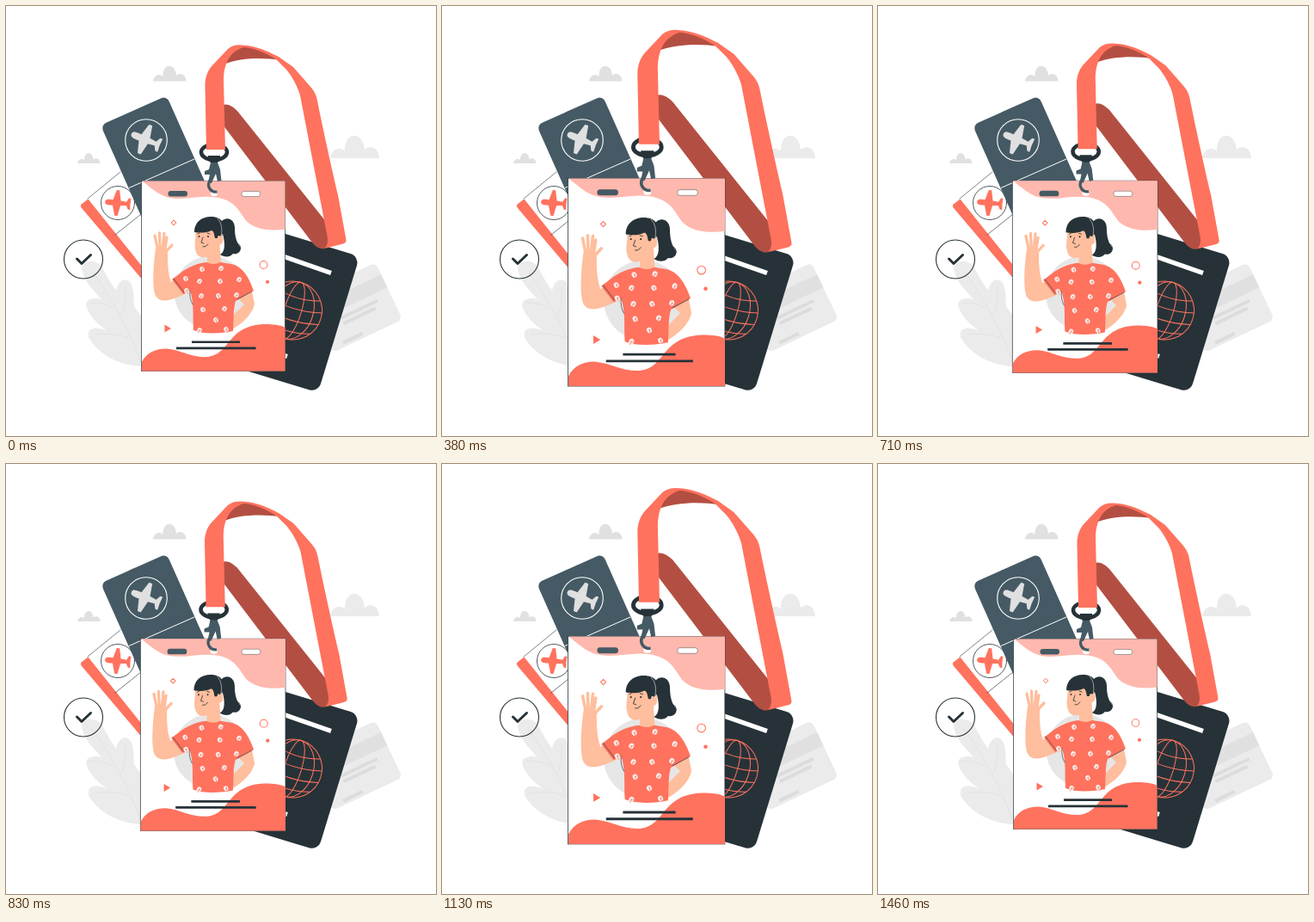
Animation of 500 by 500 pixels, one loop 1500 ms. Source, as an HTML page:

```html
<!DOCTYPE html>
<html lang="en">
<head>
<meta charset="utf-8">
<title>Travel badge</title>
<style>
  html, body { margin: 0; width: 100%; height: 100%; overflow: hidden; background: #fff; }
  svg { display: block; width: 100%; height: 100%; }
  .coral { fill: #ff725e; }
  .dark { fill: #263238; }
  .slate { fill: #455a64; }
  .shade { fill: #b34f42; }
  .skin { fill: #ffbe9d; }
  .pale { fill: #ebebeb; }
  .grey { fill: #e0e0e0; }
  .line { fill: none; stroke: #263238; stroke-linecap: round; stroke-linejoin: round; }
  .coralLine { fill: none; stroke: #ff725e; }
</style>
</head>
<body>
<svg viewBox="0 0 500 500">
  <defs>
    <path id="cloud" d="M0 17.500C1 10 8 8 11.500 12C11-4 26-4 27 11C31 7 38 9 38.500 17.500Z"/>
    <path id="plane" d="M-18 0C-18-3.500-14-4-10-4H-7L-3-18H1L4-3.500L12-2.500L15-8H18L17.500 0L18 8H15L12 2.500L4 3.500L1 18H-3L-7 4H-10C-14 4-18 3.500-18 0Z"/>
    <g id="leaf"><ellipse rx="2.700" ry="3.100" fill="#f6ece9"/><path class="coralLine" stroke-width=".6" d="M0 4V-1M0 1L1.500-1"/></g>
  </defs>

  <use href="#cloud" class="grey" x="171" y="70"/>
  <use href="#cloud" class="grey" transform="translate(83 171) scale(.69)"/>
  <use href="#cloud" class="pale" transform="translate(377 151) scale(1.48)"/>

  <g class="pale">
    <path d="M88 304C92 293 108 295 113 306C117 314 121 321 128 331C130 321 136 316 142 319C149 324 148 336 149 349L160 365V419C132 419 108 405 97 387C93 378 99 373 109 375C115 376 119 378 123 381C109 373 94 358 93 347C94 340 104 339 111 341C101 330 89 318 88 304Z"/>
    <path d="M100 308C116 330 140 368 157 415M97 345Q117 345 126 352M104 382Q126 379 143 386M139 326Q140 350 134 360" fill="none" stroke="#dedede" stroke-width=".7"/>
  </g>

  <g transform="translate(430.500 298) rotate(-25.500)">
    <rect class="pale" x="-91" width="90" height="73" rx="6"/>
    <rect class="grey" x="-91" y="15" width="90" height="17"/>
    <path d="M-65 41H-18M-65 48H-24M-75 68H-50" stroke="#dcdcdc" stroke-width="4"/>
  </g>

  <rect class="dark" x="-115" width="115" height="165.500" rx="11" transform="translate(411.200 291.300) rotate(17)"/>
  <path d="M315 288.500L378 310.500M300 399L327 407.500" stroke="#fff" stroke-width="5.500"/>
  <g id="globe" class="coralLine" transform="translate(333.500 354) rotate(17)"></g>

  <path d="M88 230L133 193L205 280L158 318Z" fill="#fff"/>
  <path class="coral" d="M95.500 224.500L160 305V320L88 235C86 232 87 231 89 229.500Z"/>
  <path class="line" d="M95 224L133 193" stroke-width=".6"/>
  <path class="line" d="M127 266L157 242" stroke-width=".7" stroke-dasharray="2 1"/>
  <circle class="line" cx="130" cy="229" r="19.500" stroke-width=".8"/>
  <use href="#plane" class="coral" transform="translate(130 229) rotate(5) scale(.83)"/>

  <rect class="slate" width="84" height="160" rx="7" transform="translate(110 138.500) rotate(-24)"/>
  <path d="M143 211.500L219 178" stroke="#fff" stroke-width="1"/>
  <circle cx="163" cy="156" r="24.300" fill="none" stroke="#fff" stroke-width="1.100"/>
  <use href="#plane" class="grey" transform="translate(162.500 155.500) rotate(22)"/>

  <circle class="line" cx="90" cy="294.500" r="22.500" stroke-width="1.100"/>
  <path class="line" d="M82.500 294L88 299.500L98.500 289.500" stroke-width="3"/>

  <g id="badge">
    <path class="shade" d="M252 115C258 113 264 117 269 122L373 252L378 276L370 282C365 283 360 280 356 275L252 138ZM253 68C255 56 262 47 272 46L292 49L318 63C300 60 272 60 253 68Z"/>
    <ellipse class="line" cx="242" cy="170" rx="15" ry="9" stroke-width="4.500"/>
    <path class="coral" d="M233 167L231.500 95C231 82 235 74 241 68L258 50C263 46 268 45 274 45.500C290 46 303 52 317 59L334 71L355 95Q360 101 361.500 108C369 145 379 190 386 220L395.500 272Q396 276 390 277L370 282C374 279 375 273 373 265L342 104C339 93 332 81 326 74L314 62C302 54 285 48 276 48C262 53 254 63 253 85L255 167Z"/>

    <rect x="157.500" y="203.500" width="167" height="221" fill="#fff" stroke="#263238" stroke-width=".7"/>
    <path d="M158 203.500H324.500V259.500C309 261.500 291 261 279.500 250C271 240 268 226 244 222.500C225 219.500 207 227 188 222.500C176 219 168 211 159 204Z" fill="#ffb8ae"/>
    <path class="coral" d="M158 424.500V414C163 403 175 398 187 398.500C204 400 215 409 234 408C262 405 256 372 300 370C312 370 320 371 324.500 374V424.500Z"/>
    <rect class="slate" x="188.500" y="215" width="22.500" height="6.500" rx="3.200"/>
    <rect x="274" y="215.500" width="21.500" height="6" rx="2.500" fill="#fff" stroke="#263238" stroke-width=".4"/>
    <rect x="238" y="214" width="8" height="7" rx="3" fill="#fff"/>

    <path class="dark" d="M235 174H249V179L246 182V187H238V182L235 179Z"/>
    <path class="slate" d="M238 182H246L249 190L250.500 203L246 204L244 195L239 206L235 205L237 196H231V192L236 190Z"/>
    <path d="M237 203C233 210 238 217 245.500 216" fill="none" stroke="#455a64" stroke-width="3.300"/>

    <circle cx="238" cy="333" r="42.500" fill="#e6e6e6"/>
    <path class="skin" d="M174 282C171 304 170 329 174 337C180 347 194 342 214 332L207 313L192 321C188 309 188 298 188 285C185 278 177 277 174 282ZM271 341L277 347L263 361V376C277 368 287 357 289 346.500L286 332ZM234 285V299Q242 306 250 299L248 270ZM221 260L219.500 278C220 287 223 292 229 292.500C236 292 239 289 241 284L252 275V261Z"/>
    <path d="M176 281L173 267M179 279L178.500 264M182.500 279L184 264.500M185 282L187 269M185.500 286L193 278" fill="none" stroke="#ffbe9d" stroke-width="3.300" stroke-linecap="round"/>
    <path class="coral" d="M233 298C223 299 214 303 206 308L193 318L206 335L214 331C219 345 217 360 218 377C230 382 250 381 264 378C265 365 264 352 267 343L288 331C283 317 276 303 262 300L249 298Q242 302 233 298Z"/>
    <path class="line" d="M214 331Q213 340 217 347M195 317L207 333M269 341L286 332" stroke-width=".6"/>
    <g id="leaves"></g>

    <path class="dark" d="M219 263C219 251 228 245 238 245C244 245 249 247 251 250C257 244 266 248 266 258C266 268 268 275 273 281C273 287 268 289 264 288C260 293 253 292 249 289C255 286 255 276 252 265L249 268Q246 265 246 270L243 270C242 266 242 262 239 261C233 264 226 264 219 263Z"/>
    <circle class="skin" cx="249" cy="271" r="3.300"/>
    <path class="line" d="M267 276Q274 276 272 283M223 265L225 264M234 264L237 265M229 269L227 275L230 276M229 280Q232 281 235 277" stroke-width=".8"/>
    <path d="M246 247Q253 254 250 269" fill="none" stroke="#ddd" stroke-width=".6"/>
    <circle class="dark" cx="224.500" cy="268" r="1"/>
    <circle class="dark" cx="235" cy="268" r="1"/>

    <path d="M216 390.700H272M198 397.800H290.500" stroke="#263238" stroke-width="2.700"/>
    <path class="coralLine" d="M195 249.200L197.800 252L195 254.800L192.200 252Z"/>
    <circle class="coralLine" cx="299.500" cy="301" r="4.400"/>
    <circle class="coral" cx="304" cy="320.800" r="2.100"/>
    <path class="coral" d="M184.500 370.500L192 375L184.500 379.500Z"/>
  </g>
</svg>
<script>
  const byId = id => document.getElementById(id);

  byId('globe').innerHTML =
    [34, 24, 10].map(rx => `<ellipse rx="${rx}" ry="34"/>`).join('') +
    [-20, -7, 7, 20].map(y => {
      const x = Math.sqrt(34 * 34 - y * y);
      return `<path d="M${-x} ${y}Q0 ${y + 9} ${x} ${y}"/>`;
    }).join('');

  const leafSpots = [
    [228, 306], [250, 305], [209, 317], [225, 320], [249, 320], [271, 318], [210, 331], [227, 337],
    [247, 337], [268, 336], [229, 353], [254, 352], [244, 365], [225, 377], [256, 376]
  ];
  byId('leaves').innerHTML = leafSpots.map(([x, y], i) =>
    `<use href="#leaf" transform="translate(${x} ${y}) rotate(${i % 2 ? 25 : -25})"/>`).join('');

  // Two heartbeats per loop: [time in ms, growth]
  const LOOP = 1500;
  const beats = [
    [0, 0], [210, .069], [350, .1], [580, .045], [750, 0], [830, .01],
    [1000, .045], [1080, .078], [1160, .1], [1250, .068], [1460, 0], [LOOP, 0]
  ];

  function growth(t) {
    const i = beats.findIndex(([end]) => t < end);
    const [t0, g0] = beats[i - 1], [t1, g1] = beats[i];
    return g0 + (g1 - g0) * (t - t0) / (t1 - t0);
  }

  function draw() {
    const scale = 1 + growth(performance.now() % LOOP);
    byId('badge').setAttribute('transform', `translate(276.5 235) scale(${scale}) translate(-276.5 -235)`);
    requestAnimationFrame(draw);
  }
  draw();
</script>
</body>
</html>
```
